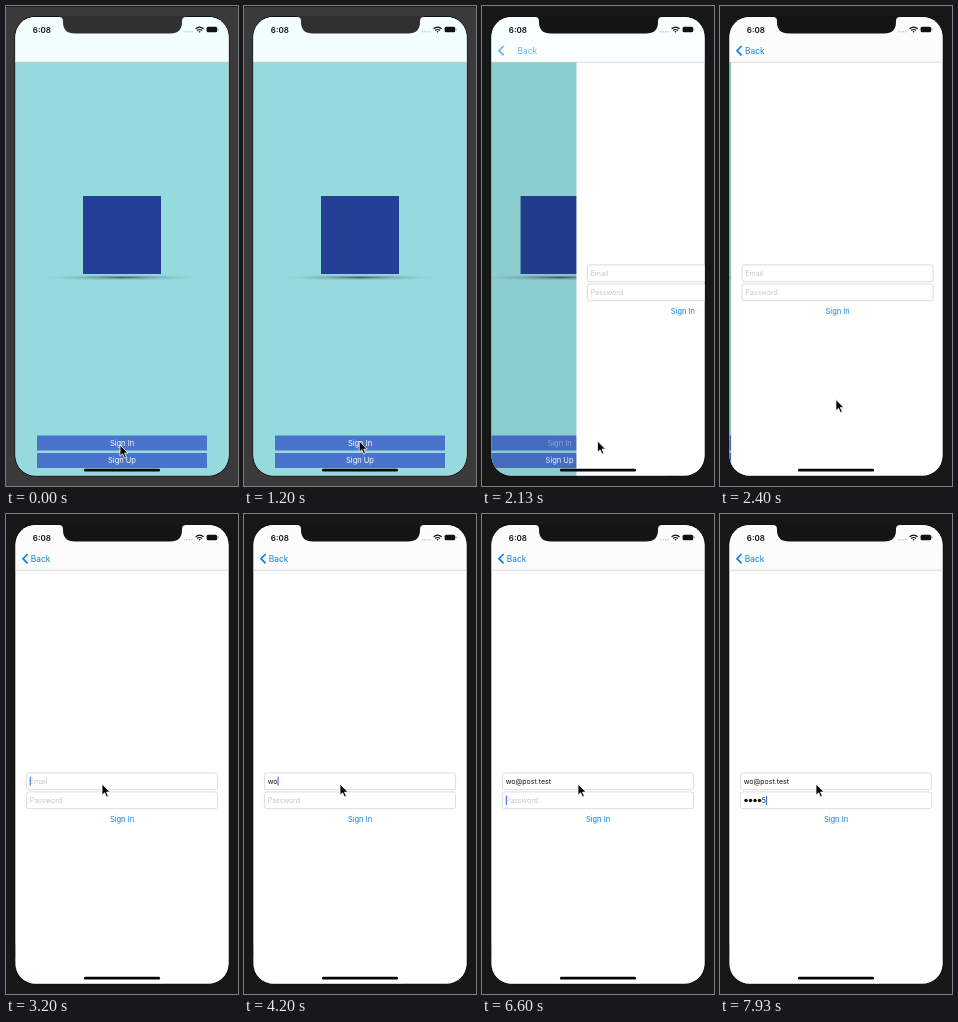
An HTML page for the animation above (8000 ms loop, 232 px wide and 480 px high).

```html
<!DOCTYPE html>
<html lang="en">
<head>
<meta charset="utf-8">
<title>Sign-in flow</title>
<style>
  html, body { margin: 0; width: 100%; height: 100%; overflow: hidden; background: #3a3a3a; }
  svg { display: block; width: 100%; height: 100%; }
  text { font-family: Inter, Roboto, sans-serif; font-size: 7px; white-space: pre; }
  .button { font-size: 7.5px; text-anchor: middle; }
  .hint { fill: #c3c5ca; }
  .field { fill: #fff; stroke: #d3d3d3; stroke-width: .8; }
</style>
</head>
<body>
<svg viewBox="0 0 232 480" preserveAspectRatio="none">
  <defs>
    <clipPath id="screen"><rect x="9.5" y="11" width="213" height="458.5" rx="20"/></clipPath>
    <radialGradient id="shade">
      <stop offset="0" stop-color="#35494d" stop-opacity=".85"/>
      <stop offset=".45" stop-color="#5c7c80" stop-opacity=".4"/>
      <stop offset="1" stop-color="#7fb5b8" stop-opacity="0"/>
    </radialGradient>
  </defs>

  <rect id="bezel" width="232" height="480"/>
  <rect width="232" height="1" fill="#161616"/>
  <rect x="8.5" y="10" width="215" height="460.5" rx="21" fill="#111"/>

  <g clip-path="url(#screen)">
    <rect x="9" y="11" width="214" height="459" fill="#fff"/>
    <g id="home">
      <rect x="9" y="56" width="214" height="414" fill="#95dbdd"/>
      <ellipse cx="116" cy="271.5" rx="80" ry="3.2" fill="url(#shade)"/>
      <rect x="77" y="190" width="78" height="78" fill="#233f96"/>
      <rect x="31" y="429.5" width="170" height="15" fill="#4a73cb"/>
      <rect x="31" y="447" width="170" height="15" fill="#4a73cb"/>
      <text id="tap" class="button" x="116" y="439.8" fill="#fff">Sign In</text>
      <text class="button" x="116" y="457.4" fill="#fff">Sign Up</text>
    </g>
    <rect id="dim" x="9" y="56" width="214" height="414"/>

    <g id="form">
      <rect x="9.5" y="56" width="214" height="414" fill="#fff"/>
      <rect class="field" x="20.4" y="258.9" width="191.2" height="16.8" rx="2.5"/>
      <rect class="field" x="20.4" y="277.9" width="191.2" height="16.8" rx="2.5"/>
      <text id="mailHint" class="hint" x="23.7" y="269.6">Email</text>
      <text id="passHint" class="hint" x="23.7" y="288.8">Password</text>
      <text id="mail" x="23.7" y="269.6" fill="#111"></text>
      <path id="squiggle" d="M24 271.4h10.5" stroke="#e0443e" stroke-width="1" stroke-dasharray="1 .5"/>
      <g id="dots" fill="#111"></g>
      <text id="digit" y="288.8" fill="#111"></text>
      <rect id="caret" width="1.1" height="9.4" rx=".5" fill="#3d6be0"/>
      <text class="button" x="116" y="307.5" fill="#1180dc">Sign In</text>
    </g>

    <rect x="9" y="11" width="214" height="45" fill="#fcfcfc"/>
    <rect id="tint" x="9" y="11" width="214" height="45" fill="#f3feff"/>
    <rect x="9" y="55.8" width="214" height=".7" fill="#c6cccd"/>
    <g id="back">
      <path d="M21.6 40 17 44.7l4.6 4.7" fill="none" stroke="#1180dc" stroke-width="1.7"/>
      <text id="backLabel" y="47.8" fill="#1180dc" style="font-size:8.4px">Back</text>
    </g>

    <text x="26.8" y="27" style="font-size:8px;font-weight:600" fill="#111">6:08</text>
    <g fill="#c4c4c4">
      <circle cx="178.5" cy="25.7" r=".8"/><circle cx="181" cy="25.7" r=".8"/>
      <circle cx="183.5" cy="25.7" r=".8"/><circle cx="186" cy="25.7" r=".8"/>
    </g>
    <g fill="none" stroke="#111" stroke-width="1.2">
      <path d="M189.6 22.8q4-3.4 8 0M191.1 24.5q2.5-2 5 0"/>
      <path d="M193.6 26.7l-1.1-1.2q1.1-.8 2.2 0z" fill="#111" stroke="none"/>
    </g>
    <rect x="200.6" y="20.8" width="10.6" height="5.4" rx="1.5" fill="#111"/>
    <rect x="211.7" y="22.6" width=".9" height="1.9" rx=".4" fill="#888"/>
    <rect x="78" y="462.8" width="76" height="2.7" rx="1.35" fill="#050505"/>
  </g>
  <path id="notch" d="M53 10V11q4 0 4 4v1q0 11.5 12 11.5h95q12 0 12-11.5v-1q0-4 4-4v-1z"/>
  <path id="cursor" d="M0 0V11.2l2.6-2.4 1.9 4.3 1.9-.8-1.9-4.2h3.5z" fill="#050505" stroke="#fff" stroke-width=".8" stroke-linejoin="round"/>
</svg>

<script>
const LOOP = 8000, WIDTH = 213, PUSH = 2020;
const ADDRESS = 'wo@post.test';
const mailKeys = [3700, 3900, 4450, 4850, 5100, 5330, 5470, 5620, 5820, 5960, 6090, 6220];
const passKeys = [6850, 7120, 7370, 7610, 7850];
const FOCUS = 2930, TAB = 6520;
const pointer = [
  [0, 114, 439], [500, 115, 435], [2180, 115.5, 435], [2400, 116, 394],
  [2600, 98, 296], [2730, 93, 280.5], [2870, 96, 270]
];

const el = {};
document.querySelectorAll('svg [id]').forEach(node => el[node.id] = node);
const set = (node, attrs) => {
  for (const name in attrs) node.setAttribute(name, attrs[name]);
};
const show = (node, on) => set(node, { opacity: +on });
const clamp = v => Math.min(1, Math.max(0, v));
const typed = (keys, t) => keys.filter(k => k <= t).length;

const dots = passKeys.map((_, i) => {
  const dot = document.createElementNS(el.dots.namespaceURI, 'circle');
  set(dot, { cx: 26 + i * 4.5, cy: 286.4, r: 1.75 });
  return el.dots.appendChild(dot);
});

function pointerAt(t) {
  const i = pointer.findIndex(p => p[0] > t);
  if (i < 0) return pointer[pointer.length - 1].slice(1);
  const a = pointer[i - 1], b = pointer[i], k = (t - a[0]) / (b[0] - a[0]);
  return [a[1] + (b[1] - a[1]) * k, a[2] + (b[2] - a[2]) * k];
}

// Critically damped spring: share of the push still to go.
function remaining(t) {
  const s = Math.max(0, t - PUSH) * 0.01826;
  return t > PUSH + 520 ? 0 : Math.exp(-s) * (1 + s);
}

function drawPush(t) {
  const left = remaining(t), done = 1 - left;
  set(el.home, { transform: `translate(${-0.3 * WIDTH * done})` });
  set(el.form, { transform: `translate(${WIDTH * left})` });
  set(el.dim, { opacity: 0.1 * done });
  set(el.tint, { opacity: left });
  set(el.back, { opacity: done });
  set(el.backLabel, { x: 24.8 + 27 * left });
  const pressed = t < 1870 ? 0 : 1 - clamp((t - 2000) / 500);
  set(el.tap, { opacity: 1 - 0.78 * pressed });
}

function drawForm(t) {
  const n = typed(mailKeys, t), m = typed(passKeys, t), inPass = t >= TAB;
  el.mail.textContent = ADDRESS.slice(0, n);
  show(el.mailHint, !n);
  show(el.passHint, !m);
  show(el.squiggle, n > 2 && !inPass);
  dots.forEach((dot, i) => show(dot, i < m - 1));
  const digitX = 23.8 + Math.max(0, m - 1) * 4.5;
  el.digit.textContent = m || '';
  set(el.digit, { x: digitX });

  const end = inPass
    ? digitX + (m ? el.digit.getComputedTextLength() : 0)
    : 23.7 + (n ? el.mail.getComputedTextLength() : 0);
  const last = Math.max(FOCUS, ...[TAB, ...mailKeys, ...passKeys].filter(k => k <= t));
  const lit = t >= FOCUS && (t - last) % 1000 < 560;
  set(el.caret, { x: end, y: inPass ? 281.6 : 262.4, opacity: +lit });
}

function draw(t) {
  const bezel = t < 1800 ? '#3a3a3a' : '#171717';
  set(el.bezel, { fill: bezel });
  set(el.notch, { fill: t < 1800 ? '#303030' : '#141414' });
  drawPush(t);
  drawForm(t);
  set(el.cursor, { transform: `translate(${pointerAt(t)})` });
}

const start = performance.now();
function tick() {
  draw((performance.now() - start) % LOOP);
  requestAnimationFrame(tick);
}
tick();
</script>
</body>
</html>
```
